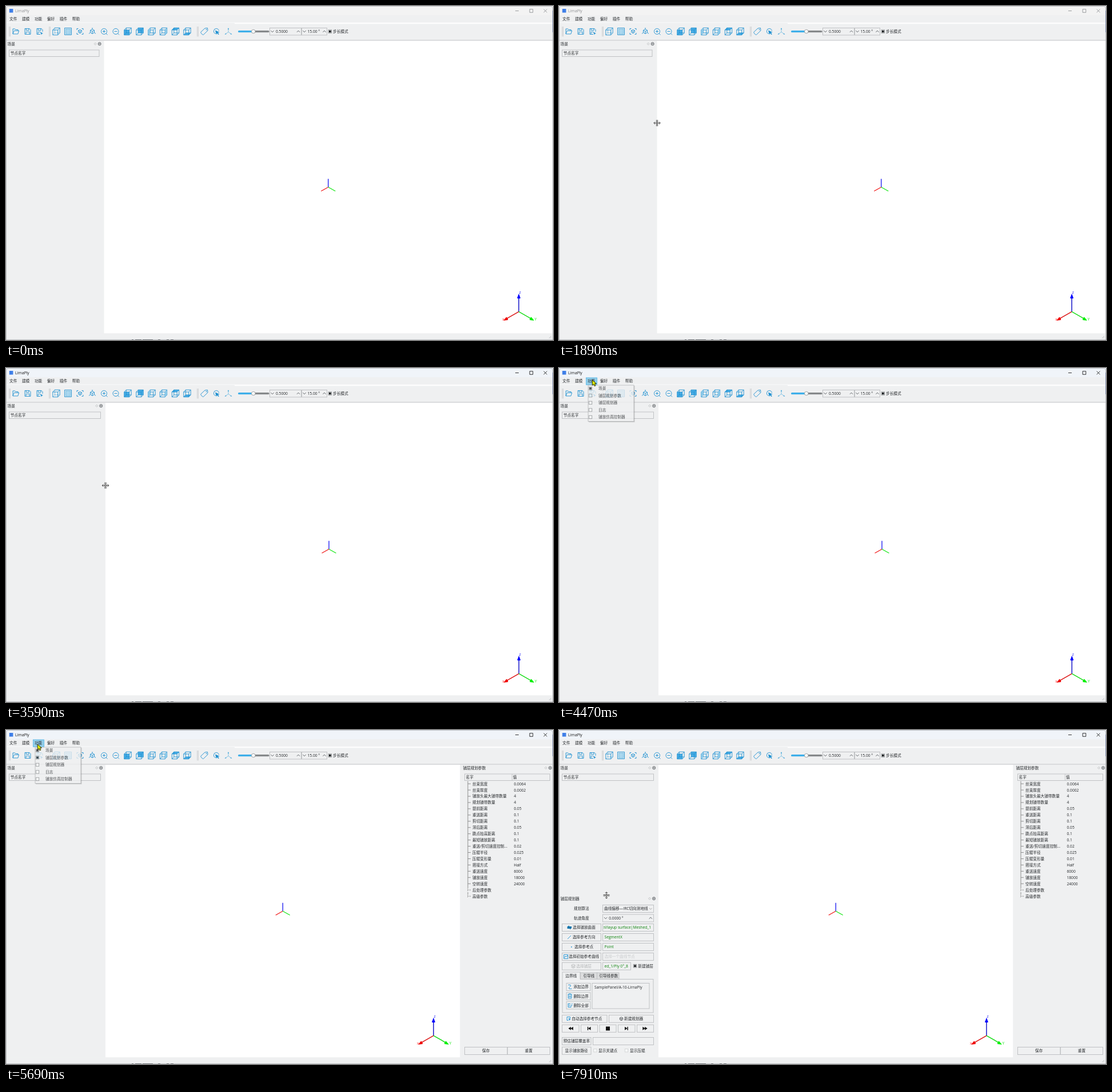
Recreate the animation shown at these times as an HTML page. Size 957 px wide and 585 px high, loop 8 s.

```html
<!DOCTYPE html>
<html lang="zh-CN">
<head>
<meta charset="utf-8">
<title>LirnaPly</title>
<style>
html, body { margin: 0; width: 100%; height: 100%; overflow: hidden; background: #eff0f1; }
svg { display: block; width: 957px; height: 585px; }
text { font: 6.67px "Open Sans", "Noto Sans CJK SC", "Noto Sans CJK", sans-serif; fill: #232629; white-space: pre; }
.ico { fill: none; stroke: #1c8fd1; stroke-width: .9; stroke-linejoin: round; }
.ln { fill: none; stroke: #3a3f44; stroke-width: .8; }
</style>
</head>
<body>
<svg id="stage" viewBox="0 0 957 585" xmlns="http://www.w3.org/2000/svg"></svg>
<script>
const LOOP = 8000, BLUE = '#3daee9', BG = '#eff0f1', EDGE = '#bbbdbf', GREEN = '#0a820a';
const NAME = 'LirnaPly';

// ---- drawing helpers, all return SVG markup
const rect = (x, y, w, h, fill, extra = '') => `<rect x="${x}" y="${y}" width="${w}" height="${h}" fill="${fill}" ${extra}/>`;
const box = (x, y, x2, y2, fill = BG, edge = EDGE) =>
  rect(x + .5, y + .5, x2 - x - 1, y2 - y - 1, fill, `stroke="${edge}" stroke-width=".9"`);
const text = (x, yc, s, fill = '#232629', extra = '') => `<text x="${x}" y="${yc + 2.4}" style="fill:${fill}" ${extra}>${s}</text>`;
const mid = (x, yc, s) => text(x, yc, s, undefined, 'text-anchor="middle"');
const path = (d, cls = 'ln', extra = '') => `<path d="${d}" class="${cls}" ${extra}/>`;
const shape = (d, fill) => `<path d="${d}" fill="${fill}"/>`;
const at = (x, y, s, extra = '') => `<g transform="translate(${x} ${y})" ${extra}>${s}</g>`;
const group = (id, s, extra = '') => `<g id="${id}" ${extra}>${s}</g>`;
const chevron = (x, y, dir) => path(`M${x - 2.6} ${y - 1.3 * dir}L${x} ${y + 1.3 * dir}L${x + 2.6} ${y - 1.3 * dir}`);
const check = (x, y, on, edge = '#8a8d90') => box(x - 3.2, y - 3.2, x + 3.2, y + 3.2, '#f6f7f7', edge) +
  (on ? rect(x - 1.8, y - 1.8, 3.6, 3.6, '#1b1e20') : '');
const dock = (x, y) => at(x, y,
  path('M-7.5 -2L-5.5 0L-7.5 2L-9.5 0Z', 'ln', 'style="stroke:#a3a6a8;stroke-width:.6"') +
  '<circle r="2.5" class="ln"/>' + path('M-1 -1L1 1M1 -1L-1 1'));

// ---- toolbar icons, centred on 0,0
const CUBE = 'M-6.2 -2.5H2.7V6.3H-6.2ZM-2.7 -6.2H6.2V2.6H-2.7ZM-6.2 -2.5L-2.7 -6.2M2.7 -2.5L6.2 -6.2M2.7 6.3L6.2 2.6M-6.2 6.3L-2.7 2.6';
const cube = face => (face ? shape(face, '#48ace4') : '') + path(CUBE, 'ico');
const ISO = r => `M0 ${-r}L${r * .87} ${-r / 2}V${r / 2}L0 ${r}L${-r * .87} ${r / 2}V${-r / 2}ZM${-r * .87} ${-r / 2}L0 0L${r * .87} ${-r / 2}M0 0V${r}`;
const FLOPPY = 'M-5 -5H3L5 -3V5H-5ZM-2.8 -5V-2H2V-5M-3 5V.8H3V5';
const LENS = 'M5 0A5 5 0 1 1 -5 0A5 5 0 1 1 5 0M3.5 3.5L6 6M-2.5 0H2.5';
const icons = [
  [17, path('M-5 4.5V-4.5H-1.5L-.3 -3H4V-1.2M-5 4.5L-2.8 -1.2H5.6L3.8 4.5Z', 'ico')],
  [38, path(FLOPPY, 'ico')],
  [59, path('M1 5H-5V-5H3L5 -3V.5M-2.8 -5V-2H2V-5M-3 5V.8H1.5', 'ico') + shape('M1 1L6 3.5L3.8 4L3 6.3Z', '#1c8fd1')],
  [88, path('M-6.2 -2.5H2.7V6.3H-6.2ZM-6.2 -2.5L-2.7 -6.2H6.2L2.7 -2.5M6.2 -6.2V2.6L2.7 6.3', 'ico') +
    path('M-2.7 -6V2.6H6M-2.7 2.6L-6.2 6.3', 'ico', 'stroke-dasharray="1.2 1.2"')],
  [108.5, path('M-6 -6H6V6H-6Z', 'ico') + rect(-4, -4, 8.4, 8.4, '#a9d6ee', 'stroke="#58b2e0" stroke-width=".7"')],
  [129.5, path('M-5.5 -2.5V-5H-3M3 -5H5.5V-2.5M5.5 2.5V5H3M-3 5H-5.5V2.5' + ISO(3.2), 'ico')],
  [151, path(ISO(4) + 'M0 -4V-6.5M-3.5 2L-6 4M3.5 2L6 4', 'ico')],
  [171.5, path(LENS + 'M0 -2.5V2.5', 'ico')],
  [192, path(LENS, 'ico')],
  [213, cube('M-6.2 -2.5H2.7V6.3H-6.2Z')],
  [234, cube('M-2.7 -6.2H6.2V2.6H-2.7Z')],
  [255, cube('') + shape('M-6.2 -2.5L-2.7 -6.2V2.6L-6.2 6.3Z', '#8fcbea')],
  [275.5, cube('') + shape('M2.7 -2.5L6.2 -6.2V2.6L2.7 6.3Z', '#8fcbea')],
  [296.5, cube('M-6.2 -2.5L-2.7 -6.2H6.2L2.7 -2.5Z')],
  [317, cube('M-6.2 6.3L-2.7 2.6H6.2L2.7 6.3Z')],
  [347, path('M-6 1L1 -5.5L5.5 -6L6 -1.5L-1.5 5.7Q-2.5 6.3 -3.4 5.5L-6 2.6Q-6.5 1.8 -6 1ZM3.2 -3.6h.8v.8h-.8Z', 'ico')],
  [368, path('M4.4 -1A4.5 4.5 0 1 0 -1 4', 'ico') + shape('M-2 -2L5.8 1.5L2.6 2.3L4.8 4.8L3.6 5.8L1.4 3.3L0 5.8Z', '#1c8fd1')],
  [389, path('M0 -5.5V1L-5.5 5M0 1L5.5 5', 'ico', 'style="stroke:#7cc0e4"') + shape('M0 -6.5L1.2 -3.5H-1.2ZM-6.4 5.6L-4.6 3L-3.3 4.8ZM6.4 5.6L4.6 3L3.3 4.8Z', '#4aa8da')]
];

const grip = x => path(`M${x} 36V53.5`, 'ln', 'style="stroke:#b6b8ba"') + path(`M${x - 1.8} 36V53.5`, 'ln', 'style="stroke:#d4d6d8"');

function chrome() {
  const menus = ['文件', '建模', '功能', '偏好', '插件', '帮助'];
  return rect(0, 0, 957, 16.5, '#f3f3f3', 'id="bar"') +
    rect(5.8, 5, 6.6, 6.6, '#3f7fe8') +
    group('cap', text(16, 8.6, NAME, 'inherit', 'font-size="6.4"') +
      '<path d="M891 8.5H897M916.2 5.7H921.8V11.3H916.2ZM940.7 5.7L946.5 11.3M946.5 5.7L940.7 11.3" fill="none" stroke="currentColor" stroke-width=".85"/>') +
    rect(0, 16.5, 957, 43.5, BG) + rect(1, 28.7, 399, 1, '#fafbfb') + rect(400, 29, 556, 2.3, '#fdfdfd') +
    rect(0, 59.5, 957, 1, '#c6c8ca') +
    rect(47.5, 17, 19, 12.3, '#93cee9', `id="lit" stroke="${BLUE}" stroke-width=".7"`) +
    menus.map((s, i) => text(6 + 21.95 * i, 23, s)).join('') +
    [7, 77, 336].map(grip).join('') + icons.map(([x, s]) => at(x, 44.5, s)).join('') +
    rect(406, 43, 27, 3.2, BLUE, 'rx="1.5"') + rect(433, 43, 27.5, 3.2, '#85888a', 'rx="1.5"') +
    '<circle cx="432.8" cy="44.6" r="3.3" fill="#fafafa" stroke="#8f9294" stroke-width=".8"/>' +
    box(461, 38, 517, 51.5) + chevron(466, 44.5, 1) + text(472, 44.7, '0.5000') + chevron(511.5, 44.5, -1) +
    box(517, 38, 562, 51.5) + chevron(522, 44.5, 1) + text(527.5, 44.7, '15.00 °') + chevron(557, 44.5, -1) +
    check(566.8, 44.6, true) + text(572, 44.7, '步长模式');
}

function frame() {
  return rect(0, 573.5, 957, 11.5, BG) + path('M950 582L954 578M952.5 582L954 580.5', 'ln', 'style="stroke:#b5b7b9"') +
    path('M.5 585V4Q.5 .5 4 .5H953Q956.5 .5 956.5 4V585M0 584.5H957', 'ln', 'style="stroke:#b4b7bb"') +
    path('M956.6 8V46', 'ln', 'style="stroke:#6d7ba6"') +
    path('M220 584.6H223M226 584.6H237M239 584.6H257M266 584.6H270M281 584.6H285M288 584.6H293', 'ln', 'style="stroke:#4b4f55"');
}

function axes() {
  const ray = (d, c, w) => `<path d="${d}" stroke="${c}" stroke-width="${w}" fill="none"/>`;
  return group('origin', ray('M0 0V-14.5', '#1414f0', 1.3) + ray('M0 0L-12.5 7', '#f01414', 1.2) + ray('M0 0L12.5 7', '#14e614', 1.2)) +
    group('gizmo', text(-29, 13, 'x', '#f33') + ray('M0 0V-25', '#1414c8', 1.5) + ray('M0 0L-21 12', '#dc1414', 1.5) + ray('M0 0L21 12', '#14dc14', 1.5) +
      shape('M0 -31.5L3 -23.5Q0 -22 -3 -23.5Z', '#0000ff') + shape('M-27 15.6L-21.8 9.4Q-19 11 -19 14.6Z', '#f00000') +
      shape('M27 15.6L21.8 9.4Q19 11 19 14.6Z', '#00f000') + text(.5, -34.2, 'z', '#2222f0') + text(27.6, 13.2, 'Y', '#19e619'));
}

function params() {
  const rows = [['丝束宽度', '0.0064'], ['丝束厚度', '0.0002'], ['铺放头最大铺带数量', '4'], ['规划铺带数量', '4'], ['提前距离', '0.05'],
    ['重送距离', '0.1'], ['剪切距离', '0.1'], ['滞后距离', '0.05'], ['跳点抬高距离', '0.1'], ['最短铺放距离', '0.1'],
    ['重送/剪切速度控制...', '0.02'], ['压辊半径', '0.025'], ['压辊变形量', '0.01'], ['搭接方式', 'Half'], ['重送速度', '6000'],
    ['铺放速度', '18000'], ['空转速度', '24000'], ['后处理参数'], ['高级参数']];
  const tree = rows.map(([k, v], i) => {
    const y = 94.2 + 10.94 * i;
    const tick = v ? `M808 ${y}H813` : `M807 ${y - 1.8}L809 ${y}L807 ${y + 1.8}M810.5 ${y}H813`;
    return path(tick, 'ln', 'style="stroke:#777"') + text(816, y, k) + (v ? text(888.5, y, v) : '');
  }).join('');
  return rect(794.5, 60.5, 161.5, 513, BG) + text(799.5, 66.8, '铺层规划参数') + dock(952, 66.3) +
    box(802, 76.5, 952, 89) + path('M885.5 77V88.5', 'ln', `style="stroke:${EDGE}"`) + text(804.5, 83, '名字') + text(887, 83, '值') +
    path('M808 89.5V277.5M808 284V288.5', 'ln', 'style="stroke:#777"') + tree +
    box(802, 555, 877.5, 569) + mid(839.7, 562, '保存') + box(877, 555, 952, 569) + mid(914.5, 562, '重置');
}

function planner() {
  const btn = (x, y, x2, tx, s, fill) => box(x, y - 7, x2, y + 7) + text(tx, y, s, fill);
  const field = (y, s, fill, x2 = 166) => box(76, y - 7, x2, y + 7) + text(79.5, y, s, fill);
  const tri = (x, y, d) => shape(`M${x} ${y - 3}L${x + 4.5 * d} ${y}L${x} ${y + 3}Z`, '#111');
  const stop = (x, y) => rect(x, y - 3, 1.4, 6, '#111');
  const Y = 522.8;
  return text(2.5, 295.3, '铺层规划器') + dock(166, 295.2) +
    text(26, 313, '规划算法') + box(76, 306, 166, 320) + text(79, 313, '曲线偏移—IRC切向测地线') +
    path('M158 312L160.3 314.3L162.6 312', 'ln', 'style="stroke:#999"') +
    text(26, 329.3, '轨迹角度') + box(76, 322.5, 166, 336.5) + chevron(81.6, 329.4, 1) + text(87.3, 329.5, '0.0000 °') + chevron(160.3, 329.4, -1) +
    btn(5, 346, 74, 24, '选择铺放曲面') + shape('M14.5 344.2L18 342.5V344H22V347L19 349.5V348H14.5Z', '#1676ad') +
    box(76, 339, 166, 353) + `<svg x="78" y="339" width="86" height="14">${text(83, 7, 'el/layup surface|Meshed_1', GREEN, 'text-anchor="end"')}</svg>` +
    btn(5, 363, 74, 23.7, '选择参考方向') + path('M15 366L21 360', 'ico') + field(363, 'SegmentX', GREEN) +
    btn(5, 380, 74, 27, '选择参考点') + rect(21, 379.2, 1.6, 1.6, '#1c8fd1') + field(380, 'Point', GREEN) +
    btn(5, 397, 74, 17, '选择初始参考曲线') + path('M8.5 393.5H15.5V400.5H8.5ZM9.5 399L11 396L13 397.5L15 394.5', 'ico') + field(397, '选择一个曲线节点', '#c9cbcd') +
    btn(5, 413.7, 74, 30.3, '选择铺层', '#b3b5b7') + at(25, 413.7, path('M0 -3.5L3.5 -1.7L0 0L-3.5 -1.7ZM-3.5 0L0 1.8L3.5 0M-3.5 1.7L0 3.5L3.5 1.7', 'ln', 'style="stroke:#b3b5b7"')) +
    field(413.7, 'ed_1/Ply 0°_8', GREEN, 126) + check(133, 413.3, true) + text(138.3, 413.3, '新建铺层') +
    box(5.5, 436, 165.5, 495.5) + box(37, 424.5, 67, 437, '#dcddde') + box(66, 424.5, 105.5, 437, '#dcddde') +
    box(5.5, 423.5, 37.5, 437) + rect(6.2, 435.5, 30.6, 2, BG) +
    text(11.3, 430.4, '边界线') + text(42.3, 430.4, '引导线') + text(70, 430.4, '引导线参数') +
    btn(12.5, 450, 55.5, 25.2, '添加边界') + path('M16 446.5H20Q21.5 449 18.5 450.2Q16 452 18 453.3H22.5', 'ico') +
    btn(12.5, 466.3, 55.5, 25.2, '删除边界') + path('M15.5 463H22.5M17.5 463V462H20.5V463M16.2 463V470H21.8V463M18 465V468.5M20 465V468.5', 'ico') +
    btn(12.5, 482.3, 55.5, 25.2, '删除全部') + path('M15.5 479.5H20M16 479.5V485.5H21V481M18 481V484M22 479.5H23.5M22 482H23.5', 'ico') +
    box(57.5, 443, 158.5, 488.5) + text(62, 450.8, `SamplePanel/A-10-${NAME}`) +
    btn(5, 505.8, 84.5, 22.2, '自动选择参考节点') + path('M14 502.5H19.5V505M14 502.5V508.5H16.5', 'ico') + shape('M16.5 504.5L21 506.5L19 507L18.2 509.5Z', '#1c8fd1') +
    btn(87, 505.8, 166, 114, '新建规划器') + at(109, 505.8, path(ISO(3), 'ln')) +
    [[5, 35.5], [38, 68], [70.5, 100.5], [103, 133.5], [136, 166]].map(([a, b]) => box(a, Y - 7, b, Y + 7)).join('') +
    tri(20.8, Y, -1) + tri(24.8, Y, -1) + stop(49.8, Y) + tri(55.5, Y, -1) + rect(82, Y - 3.4, 7, 7, '#111') +
    tri(115, Y, 1) + stop(119.4, Y) + tri(146.3, Y, 1) + tri(150.2, Y, 1) +
    btn(5, 545, 56.5, 7.6, '预估铺层覆盖率') + box(59, 538, 166, 552) +
    btn(5, 561.7, 56.5, 10.6, '显示铺放路径') + check(63.3, 561.3, false, '#d3d5d6') + text(69, 561.5, '显示关键点') +
    check(118, 561.3, false, '#d3d5d6') + text(124, 561.5, '显示压辊');
}

const ROW = 12.55;
function popup() {
  const items = ['场景', '铺层规划参数', '铺层规划器', '日志', '铺放仿真控制器'];
  return rect(52, 31, 80.5, 64, '#000', 'opacity=".22"') + box(50.5, 29.5, 131.5, 94, BG, '#a9acae') +
    rect(51.5, 0, 79, 11.8, '#93cee9', `id="hover" stroke="${BLUE}" stroke-width=".7"`) +
    items.map((s, i) => {
      const y = 35.8 + ROW * i;
      return check(55, y, i === 0) + (i === 1 ? rect(53.2, y - 1.8, 3.6, 3.6, '#1b1e20', 'id="tick"') : '') + text(69, y, s);
    }).join('');
}

const SPLIT = 'M-1 -5.5V5.5M1 -5.5V5.5M-1 0H-5.5M1 0H5.5M-3.6 -2.2L-5.8 0L-3.6 2.2M3.6 -2.2L5.8 0L3.6 2.2';
const split = id => group(id, `<path d="${SPLIT}" fill="none" stroke="#fff" stroke-width="2.2"/><path d="${SPLIT}" fill="none" stroke="#222" stroke-width=".9"/>`);

const stage = document.getElementById('stage');
stage.innerHTML = rect(0, 0, 957, 585, BG) + rect(171.5, 61, 784.5, 512.5, '#fff', 'id="view"') +
  text(2.5, 66.8, '场景') + group('dock', dock(-7.8, 66.3)) +
  rect(5.5, 77, 157.5, 11.5, BG, `id="head" stroke="${EDGE}" stroke-width=".9"`) + text(7.8, 83, '节点名字') +
  axes() + group('params', params()) + group('planner', planner()) + chrome() + frame() +
  group('popup', popup()) +
  group('arrow', '<path d="M0 0L.3 9.4L2.5 7.4L4.2 10.8L6 9.9L4.4 6.7L7.4 6.3Z" fill="#e2f000" stroke="#1c1c00" stroke-width=".9" stroke-linejoin="round"/>') +
  split('splitX') + split('splitY');

// ---- motion tables: [ms, value...], linear between rows
const POINTER = [
  [200, 666, 562], [260, 520, 460], [330, 320, 335], [400, 190, 270], [470, 148, 250], [620, 148, 250],
  [760, 124, 205], [900, 96, 145], [1030, 76, 100], [1110, 73, 84], [1220, 74, 93], [1270, 74, 93], [1340, 110, 112], [1400, 144, 132], [1450, 144, 132],
  [1600, 155, 160], [1750, 165, 190], [1890, 171.5, 205], [2120, 171.5, 205], [2220, 171.5, 206],
  [3290, 173, 206], [3590, 173, 206], [3800, 150, 160], [4050, 95, 80], [4250, 64, 30], [4390, 58, 21], [4520, 58, 21],
  [4650, 64, 34], [4780, 71, 45], [4900, 74, 48], [5190, 74, 48], [5330, 62, 33], [5470, 55, 25], [5760, 55, 25],
  [5900, 62, 38], [6050, 71, 54], [6170, 74, 60], [6540, 74, 60], [6620, 90, 130], [6710, 106, 225], [6790, 111, 262],
  [6970, 111, 262], [7050, 111, 268], [7200, 111, 268], [7400, 109, 263], [7600, 99, 272], [7800, 86, 285], [7910, 83, 289.5]];
const EDGE_X = [[2550, 171.5], [2650, 178], [2740, 183], [2820, 183], [2920, 185], [3060, 185], [3180, 179], [3290, 174]];
const FADE = [[4420, .4], [4470, .78], [4520, .78], [4570, 1], [5140, 1], [5141, 0], [5609, 0], [5610, .4], [5690, .78], [5760, .78], [5810, 1], [6404, 1], [6405, 0]];

function along(rows, t) {
  const i = rows.findIndex(r => r[0] > t);
  if (i === 0) return rows[0].slice(1);
  if (i < 0) return rows[rows.length - 1].slice(1);
  const a = rows[i - 1], b = rows[i], k = (t - a[0]) / (b[0] - a[0]);
  return a.slice(1).map((v, j) => v + (b[j + 1] - v) * k);
}

const el = id => document.getElementById(id);
const set = (id, attrs) => { for (const k in attrs) el(id).setAttribute(k, attrs[k]); };
const show = (id, on) => { el(id).style.display = on ? '' : 'none'; };
const move = (id, x, y) => set(id, { transform: `translate(${x} ${y})` });

function render(t) {
  const [left] = along(EDGE_X, t), right = t >= 5140 ? 794.5 : 956, wide = right - left;
  const [px, py] = along(POINTER, t);
  const fade = t < 4420 ? 0 : along(FADE, t)[0];
  const active = t >= 2550, dragX = t >= 1850 && t < 3600, dragY = t >= 7840;

  set('bar', { fill: active ? '#f0f4f9' : '#f3f3f3' });
  el('cap').style.fill = el('cap').style.color = active ? '#111' : '#8b8d90';
  set('view', { x: left, width: wide });
  set('head', { width: left - 14 });
  move('dock', left, 0);
  move('origin', left + wide / 2, 317.3);
  move('gizmo', left + wide * .925, 535.3);

  show('params', t >= 5140);
  show('planner', t >= 6405);
  show('tick', t >= 5140);
  show('popup', fade > 0);
  set('popup', { opacity: fade });
  show('lit', fade > 0 || (px > 47 && px < 67 && py > 17 && py < 29));
  const row = Math.floor((py - 29.6) / ROW);
  show('hover', row >= 0 && fade > 0);
  set('hover', { y: 29.9 + ROW * Math.max(row, 0) });

  show('arrow', t >= 200 && !dragX && !dragY);
  move('arrow', px, py);
  show('splitX', dragX);
  move('splitX', t < 2550 ? px : left, py);
  show('splitY', dragY);
  set('splitY', { transform: `translate(${px} ${py}) rotate(90)` });
}

function tick() {
  render(performance.now() % LOOP);
  requestAnimationFrame(tick);
}
tick();
</script>
</body>
</html>
```
